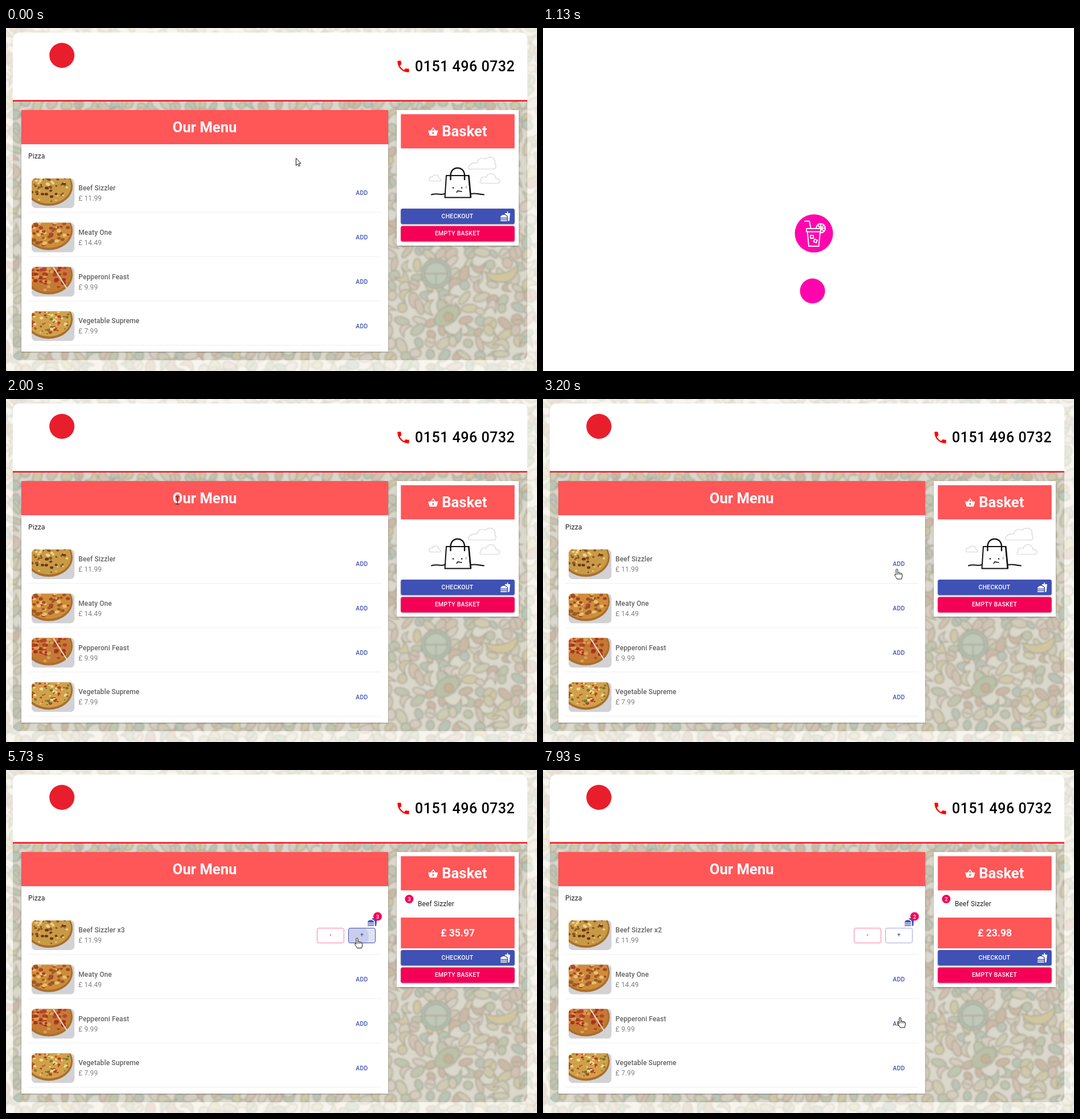
An HTML page with a canvas that plays this animation: 931x602 px, repeating every 8 s.

```html
<!DOCTYPE html>
<html lang="en">
<head>
<meta charset="utf-8">
<title>Takeaway menu</title>
<style>
  html, body { margin: 0; width: 100%; height: 100%; overflow: hidden; background: #fff; }
  #stage { position: relative; width: 931px; height: 602px; overflow: hidden; background: #ece8db; }
  #stage canvas { position: absolute; left: -10px; top: -10px; filter: blur(1.8px); }
  #stage svg { position: absolute; left: 0; top: 0; }
  text { font-family: Roboto, Arial, sans-serif; font-size: 12px; letter-spacing: .11px; fill: #222; }
  .title { font-size: 25.6px; font-weight: 700; letter-spacing: 0; fill: #fff; }
  .phone { font-size: 25px; font-weight: 500; letter-spacing: .5px; fill: #000; }
  .name { font-weight: 500; fill: #636363; }
  .price { fill: #808080; }
  .btn { font-size: 10.4px; font-weight: 500; letter-spacing: .3px; text-anchor: middle; }
  .blue { fill: #3f51b5; }
  .pink { fill: #f50057; }
  .white { fill: #fff; }
  .red { fill: #ff5658; }
  .mid { text-anchor: middle; }
  .card { fill: #fff; filter: drop-shadow(0 1px 1px rgba(0,0,0,.35)); }
  .raised { filter: drop-shadow(0 1px 1px rgba(0,0,0,.4)); }
  .badge text { font-size: 9.6px; font-weight: 500; letter-spacing: 0; text-anchor: middle; fill: #fff; }
  .line { fill: none; stroke-linecap: round; stroke-linejoin: round; }
</style>
</head>
<body>
<div id="stage">
  <canvas id="pattern" width="951" height="622"></canvas>
  <svg width="931" height="602" viewBox="0 0 931 602">
    <defs>
      <clipPath id="photo"><rect width="75" height="52" rx="7"/></clipPath>
      <clipPath id="plusClip"><rect x="600" y="277" width="48" height="27" rx="3"/></clipPath>
      <clipPath id="minusClip"><rect x="545" y="277" width="48" height="27" rx="3"/></clipPath>
      <path id="fastfood" d="M18.06 22.99h1.66c.84 0 1.53-.64 1.63-1.46L23 5.05h-5V1h-1.97v4.05h-4.97l.3 2.34c1.71.47 3.31 1.32 4.27 2.26 1.44 1.42 2.43 2.89 2.43 5.29v8.05zM1 21.99V21h15.03v.99c0 .55-.45 1-1.01 1H2.01c-.56 0-1.01-.45-1.01-1zm15.03-7c0-8-15.03-8-15.03 0h15.03zM1.02 17h15v2h-15z"/>
    </defs>

    <path fill="#fff" fill-opacity=".45" fill-rule="evenodd" d="M0 0H931V602H0ZM22 8H904a10 10 0 0 1 10 10V573a10 10 0 0 1-10 10H22a10 10 0 0 1-10-10V18a10 10 0 0 1 10-10Z"/>
    <rect x="12" y="8" width="902" height="575" rx="10" fill="#000" fill-opacity=".09"/>

    <path class="white" d="M12 127V18a10 10 0 0 1 10-10H904a10 10 0 0 1 10 10V127Z"/>
    <rect x="12" y="126.5" width="902" height="2.5" fill="#f0141e"/>
    <circle cx="98" cy="48" r="22" fill="#e91e2d"/>
    <path fill="#f00" transform="translate(683 54) scale(1.13)" d="M6.62 10.79c1.44 2.83 3.76 5.14 6.59 6.59l2.2-2.2c.27-.27.67-.36 1.02-.24 1.12.37 2.33.57 3.57.57.55 0 1 .45 1 1V20c0 .55-.45 1-1 1-9.39 0-17-7.61-17-17 0-.55.45-1 1-1h3.5c.55 0 1 .45 1 1 0 1.25.2 2.45.57 3.57.11.35.03.74-.25 1.02l-2.2 2.2z"/>
    <text class="phone" x="717" y="76">0151 496 0732</text>

    <rect class="card" x="27" y="144" width="643" height="424"/>
    <rect class="red" x="27" y="144" width="643" height="60"/>
    <text class="title mid" x="348.3" y="182.6">Our Menu</text>
    <text x="39" y="228.5">Pizza</text>
    <g id="rows"></g>

    <g id="controls">
      <g id="minus">
        <rect x="545.5" y="277.5" width="47" height="26" rx="3" fill="#fff" stroke="#f50057"/>
        <text class="btn pink" x="569" y="293.2">-</text>
      </g>
      <text id="remove" class="btn pink" x="565" y="293.2">REMOVE</text>
      <rect id="plus" x="600.5" y="277.5" width="47" height="26" rx="3" fill="#3f51b5" stroke="#3f51b5"/>
      <text id="plusText" class="btn blue" x="624" y="293.2">+</text>
      <g id="mark">
        <use href="#fastfood" class="blue" transform="translate(633.3 256.5) scale(.75)"/>
        <g class="badge"><circle class="pink" cx="651.5" cy="257" r="7.5"/><text class="count" x="651.5" y="260.5"></text></g>
      </g>
      <g clip-path="url(#plusClip)"><circle class="ripple blue"/></g>
      <g clip-path="url(#minusClip)"><circle class="ripple pink"/></g>
    </g>

    <rect id="basketCard" class="card" x="685" y="144" width="214"/>
    <rect class="red" x="692.3" y="151.3" width="199.4" height="60"/>
    <path class="white" transform="translate(739.6 172.8) scale(.77)" d="M17.21 9l-4.38-6.56c-.19-.28-.51-.42-.83-.42-.32 0-.64.14-.83.43L6.79 9H2c-.55 0-1 .45-1 1 0 .09.01.18.04.27l2.54 9.27c.23.84 1 1.46 1.92 1.46h13c.92 0 1.69-.62 1.93-1.46l2.54-9.27L23 10c0-.55-.45-1-1-1h-4.79zM9 9l3-4.4L15 9H9zm3 8c-1.1 0-2-.9-2-2s.9-2 2-2 2 .9 2 2-.9 2-2 2z"/>
    <text class="title" x="764.2" y="190.4">Basket</text>

    <g id="empty" class="line">
      <g stroke="#d6d6d6" stroke-width="1.2">
        <path d="M813 247.500H855C860 247 860 240 857 238.500 860 228 848 223 840 230 833 226 826 231 826 237 818 235 810 241 811 246Z"/>
        <path d="M743 268.500H762Q764 265 759 264C759 257 750 256 748 261.500 743 260 740 265 743 268.500Z"/>
        <path d="M834 272.500H864C868 268 864 263.500 859 264.500 858 253 843 253 842 262.500 836 259 831 264 833 268.500 829 270 831 272.500 834 272.500Z"/>
      </g>
      <g stroke="#111" stroke-width="2">
        <path d="M746 292.500Q752 290.500 758 291.500T769 291M815 291Q822 290 827 291T838 292.500"/>
        <path d="M772 259H811L814.500 297.500H769.500Z" fill="#fff"/>
        <path d="M779.500 266V258C780 241.500 803.500 241.500 804 258V266M811.500 259L815 297" stroke-width="2.400"/>
        <path d="M790.500 288.500Q791 285 794 286T799 287" stroke-width="1.700"/>
        <path d="M784 280.500h.1M799 280.500h.1" stroke-width="2.400"/>
      </g>
      <path d="M807 275.500Q811 281 807 282 803 281 807 275.500Z" fill="#cfd3d6"/>
    </g>
    <g id="filled">
      <g class="badge"><circle class="pink" cx="707" cy="226.500" r="7.500"/><text class="count" x="707" y="230"></text></g>
      <text x="722" y="239">Beef Sizzler</text>
      <rect class="red" x="692.3" y="259" width="199.4" height="54"/>
      <text id="total" class="title mid" x="792" y="292" style="font-size:17.5px"></text>
    </g>
    <g id="actions">
      <rect class="blue raised" x="692.3" y="317" width="199.4" height="27" rx="3"/>
      <text class="btn white" x="791.5" y="333.5">CHECKOUT</text>
      <use href="#fastfood" class="white" transform="translate(866.2 321.2) scale(.77)"/>
      <rect class="pink raised" x="692.3" y="347.5" width="199.4" height="27" rx="3"/>
      <text class="btn white" x="791.5" y="364">EMPTY BASKET</text>
    </g>

    <g id="loader">
      <rect width="931" height="602" fill="#fff"/>
      <g id="tint"><circle id="dot" r="22"/><circle cx="475" cy="360.5" r="33.5"/></g>
      <g class="line" stroke="#fff" stroke-width="1.9">
        <g id="burger">
          <path d="M458 356H494Q498 356 498 351C497 334 455 334 454 351Q454 356 458 356ZM459 357C454 358 456 362.5 461 362.5H491C496 362.5 498 358 493 357M459 358.5Q464 363 469 360T479 360 492 358.5"/>
          <rect x="457" y="362.5" width="38" height="6" rx="3"/>
          <path d="M456 368.5H496Q498 368.5 498 371 498 375 494 375H458Q454 375 454 371 454 368.5 456 368.5Z"/>
          <path d="M470.5 345h.1M481.5 345h.1M464.5 350h.1M476 350h.1M487.5 350h.1" stroke-width="2.2"/>
        </g>
        <g id="drink">
          <path d="M459 339H467L469.5 352M462 352H487V357.5H462ZM463.500 357.500L466 383H483.500L486 357.500"/>
          <path d="M469 364h5v5h-5ZM476.500 370.500L481 372.500 479 377 474.500 375Z"/>
          <path d="M479 351A8 8 0 1 1 487 359.500M487 351.500V344M487 351.500L481.500 346M487 351.500L492.500 346M487 351.500H494.500M487 351.500L492.500 357M487 351.500V359"/>
        </g>
      </g>
    </g>

    <g id="cursor" fill="#fff" stroke="#111" stroke-linejoin="round">
      <path id="arrow" d="M.5 .5V13.300L3.300 10.600 5.300 14.700 7.200 13.800 5.300 9.800H9.200Z"/>
      <path id="beam" fill="none" d="M-3-6.500H-1Q0-6.500 0-5.500V5.500Q0 6.500-1 6.500H-3M3-6.500H1Q0-6.500 0-5.500M3 6.500H1Q0 6.500 0 5.500"/>
      <path id="hand" d="M-1.500 10.500V1.500A1.500 1.500 0 0 1 1.500 1.500V6.500C2 5.600 4.200 5.800 4.400 7 5.200 6.300 6.800 6.600 7 7.800 7.800 7.300 9.300 7.800 9.300 9.200V12.500C9.300 14.500 8.200 15.500 8.200 17.500H0C0 15.800-3.800 12-4 10.500-4.100 9.200-2.800 8.900-1.500 10.500ZM1.500 6.500V10M4.400 7V10M7 7.800V10"/>
    </g>
  </svg>
</div>
<script>
const LOOP = 8000, PITCH = 77.8;
const $ = id => document.getElementById(id);
const all = sel => [...document.querySelectorAll(sel)];
const show = (el, on) => { el.style.display = on ? '' : 'none'; };
const clamp = v => Math.min(1, Math.max(0, v));

function seeded(seed) {
  return () => (seed = (seed * 16807) % 2147483647) / 2147483647;
}

// Blurred grocery wallpaper
function paintPattern() {
  const c = $('pattern').getContext('2d'), rnd = seeded(431);
  const colours = ['#e4dfc8', '#d5d9c3', '#e6d6c6', '#e5dcbc', '#ced8c9', '#ebe1d4', '#dfcbb9'];
  c.fillStyle = '#f0ecdf';
  c.fillRect(0, 0, 951, 622);
  c.lineWidth = 1.8;
  c.lineCap = 'round';
  const shape = (x, y, angle, fill, draw) => {
    c.save();
    c.translate(x, y);
    c.rotate(angle);
    c.fillStyle = fill;
    c.strokeStyle = '#bdb9a6';
    c.beginPath();
    draw();
    c.fill();
    c.stroke();
    c.restore();
  };
  const oval = (rx, ry) => c.ellipse(0, 0, rx, ry, 0, 0, 7);
  const curved = (w, h) => {
    c.moveTo(-w, -h);
    c.quadraticCurveTo(0, h * 1.2, w, -h);
    c.quadraticCurveTo(w * .8, h * 2, 0, h * 1.8);
    c.quadraticCurveTo(-w * .8, h * 1.6, -w, -h);
  };
  for (let y = 4; y < 630; y += 20)
    for (let x = 4; x < 960; x += 22) {
      const px = x + rnd() * 12 - 6, py = y + rnd() * 10 - 5;
      const kind = rnd(), w = 8 + rnd() * 7, h = 5 + rnd() * 4;
      shape(px, py, rnd() * 6.3, colours[Math.floor(rnd() * colours.length)], () => {
        if (kind < .6) oval(w, h);
        else if (kind < .85) curved(w, h);
        else { oval(h + 3, h + 3); c.moveTo(-h, 0); c.lineTo(h, 0); }
      });
    }
  shape(764, 441, 0, '#c3d2c3', () => oval(26, 26));
  shape(764, 441, 0, '#d3dccb', () => {
    oval(20, 20);
    c.moveTo(-20, 0); c.lineTo(20, 0); c.moveTo(0, 0); c.lineTo(0, 20);
  });
  shape(880, 440, -.2, '#e6dab0', () => curved(30, 9));
  shape(783, 515, -.6, '#ccd4b8', () => oval(24, 15));
  shape(786, 517, 0, '#dcc2a8', () => oval(8, 8));
}

// Menu rows with simplified photos
function buildRows() {
  const items = [
    ['Beef Sizzler', '11.99', '#c99a45', ['#6b3520', '#8c5526', '#ecd28a']],
    ['Meaty One', '14.49', '#cf8c3a', ['#a8452c', '#e8c068', '#9a5a2c']],
    ['Pepperoni Feast', '9.99', '#c47a34', ['#a8301f', '#b8422a', '#d8a050']],
    ['Vegetable Supreme', '7.99', '#d3a04a', ['#b5402a', '#6f7a34', '#f0dc90']]
  ];
  $('rows').innerHTML = items.map(([name, price, base, tops], i) => {
    const y = i * PITCH, rnd = seeded(77 + i * 31);
    let bits = '';
    for (let k = 0; k < 75; k++) {
      const a = rnd() * 6.28, d = Math.sqrt(rnd()), r = 1 + rnd() * 1.5 + (i % 3 ? .8 : 0);
      bits += `<ellipse cx="${30 + 36 * d * Math.cos(a)}" cy="${13 + 28 * d * Math.sin(a)}" rx="${r * 1.3}" ry="${r}" fill="${tops[k % 3]}"/>`;
    }
    const cut = i === 2 ? '<path d="M38 0L62 38" stroke="#e9dfca" stroke-width="2"/>' : '';
    return `<g transform="translate(45 ${264 + y})" clip-path="url(#photo)">
        <rect width="75" height="52" fill="#d2d1d6"/>
        <ellipse cx="30" cy="14" rx="42" ry="34" fill="#a8702c"/>
        <ellipse cx="30" cy="13" rx="39" ry="31" fill="${base}"/>${bits}${cut}</g>
      <text class="name" x="127" y="${285 + y}">${name}</text>
      <text class="price" x="127" y="${303 + y}">£ ${price}</text>
      <text class="btn blue add" x="624" y="${293.2 + y}">ADD</text>
      <rect x="39" y="${323 + y}" width="619" height="1" fill="#eee"/>`;
  }).join('');
}

paintPattern();
buildRows();

// time, x, y of the pointer
const path = [
  [70, 508, 228], [290, 112, 14], [1200, 290, 16], [1400, 300, 178],
  [2000, 300.5, 178], [2270, 331, 187.5], [2530, 331, 187.5], [2900, 661, 393],
  [3200, 620.5, 298.5], [3330, 622, 294], [3400, 622.5, 292], [4130, 622.5, 292],
  [4330, 624.5, 290], [4670, 624.5, 290], [4950, 620, 316], [5330, 615.5, 296],
  [5470, 615.5, 295], [5800, 615.5, 295], [6000, 569, 292], [6530, 569, 292],
  [6900, 624.5, 290], [7270, 624.5, 290], [7670, 627, 386], [7930, 626, 434.5]
];
const counts = [[0, 0], [3800, 1], [4730, 2], [5530, 3], [6130, 2], [6470, 1], [7070, 2]];
const clicks = [[3730, 624], [4660, 624], [5500, 616], [6100, 569], [6450, 569], [7040, 624]];
const last = (list, t) => list.filter(e => e[0] <= t).pop();

function pointerAt(t) {
  const i = path.findIndex(p => p[0] > t);
  if (i === 0) return path[0].slice(1);
  if (i < 0) return path[path.length - 1].slice(1);
  const [a, b] = [path[i - 1], path[i]];
  const u = (t - a[0]) / (b[0] - a[0]), e = u * u * (3 - 2 * u);
  return [a[1] + (b[1] - a[1]) * e, a[2] + (b[2] - a[2]) * e];
}

function drawLoader(t) {
  const on = t >= 800 && t < 1530, first = t < 1130;
  show($('loader'), on);
  if (!on) return on;
  const angle = (-39 + 264 * (t - 800) / 670) * Math.PI / 180;
  $('dot').setAttribute('cx', 475 + 101 * Math.cos(angle));
  $('dot').setAttribute('cy', 360.5 + 101 * Math.sin(angle));
  $('tint').setAttribute('fill', first ? '#ebac1f' : '#ff05ad');
  show($('burger'), first);
  show($('drink'), !first);
  return on;
}

function drawPointer(t, loading, n) {
  const [x, y] = pointerAt(t);
  const onPlus = Math.abs(x - 624) < 24 && y >= 277 && (y - 277) % PITCH < 27;
  const onMinus = n > 0 && Math.abs(x - 569) < 25 && Math.abs(y - 290.5) < 13.5;
  const hand = !loading && (onPlus || onMinus);
  const beam = !loading && Math.abs(x - 348) < 57 && Math.abs(y - 174) < 14 && t > 1500;
  show($('cursor'), t < 330 || t >= 1200);
  $('cursor').setAttribute('transform', `translate(${x} ${y})`);
  show($('hand'), hand);
  show($('beam'), beam);
  show($('arrow'), !hand && !beam);
  return n > 0 && onPlus && y < 305;
}

function drawBasket(n) {
  const names = all('.name');
  names[0].textContent = 'Beef Sizzler' + (n ? ' x' + n : '');
  all('.count').forEach(el => { el.textContent = n; });
  $('total').textContent = '£ ' + (n * 11.99).toFixed(2);
  show(all('.add')[0], !n);
  show($('empty'), !n);
  show($('filled'), n);
  show($('mark'), n);
  show($('plusText'), n);
  show($('remove'), n === 1);
  show($('minus'), n > 1);
  $('basketCard').setAttribute('height', n ? 237 : 238);
  $('actions').setAttribute('transform', `translate(0 ${n ? -1 : 0})`);
}

function drawPress(t, n, hover) {
  const [at, x] = last(clicks, t) || [-LOOP, 624];
  const age = t - at, onMinus = x < 600;
  const u = clamp(age / 460), fade = clamp((580 - age) / 250);
  all('.ripple').forEach((el, i) => {
    el.setAttribute('cx', x);
    el.setAttribute('cy', 292);
    el.setAttribute('r', 40 * u * u * (3 - 2 * u));
    el.setAttribute('opacity', i === +onMinus ? .14 * fade : 0);
  });
  const pressed = onMinus ? 0 : .12 * fade;
  $('plus').setAttribute('fill-opacity', (hover ? .04 : 0) + pressed);
  $('plus').setAttribute('stroke-opacity', !n ? 0 : hover ? 1 : .5);
  $('minus').firstElementChild.setAttribute('stroke-opacity', onMinus && t < 6800 ? 1 : .5);
}

const start = performance.now();
function frame() {
  const t = (performance.now() - start) % LOOP;
  const n = last(counts, t)[1];
  drawBasket(n);
  const hover = drawPointer(t, drawLoader(t), n);
  drawPress(t, n, hover);
  requestAnimationFrame(frame);
}
frame();
</script>
</body>
</html>
```
